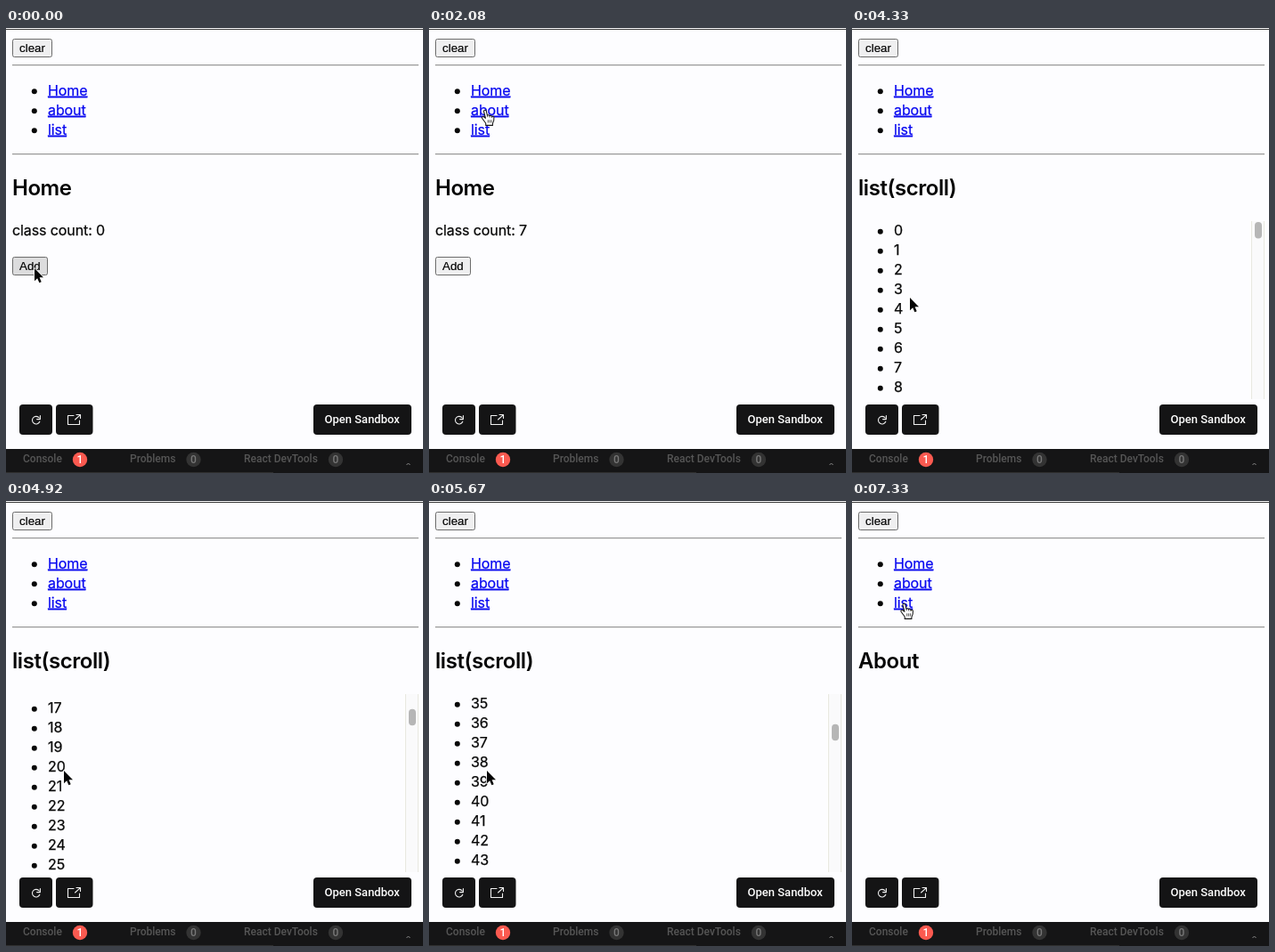
Animation, 468 px wide and 500 px high, one loop 8 s. Source, as an HTML page:

```html
<!DOCTYPE html>
<html lang="en">
<head>
<meta charset="utf-8">
<title>Keep-alive demo</title>
<style>
  html, body { margin: 0; width: 100%; height: 100%; overflow: hidden; background: #fdfdff; }
  svg { display: block; width: 100vw; height: 100vh; }
  text { white-space: pre; }
  .body { font: 400 16px Inter, sans-serif; letter-spacing: -.1px; color: #080808; fill: currentColor; stroke: currentColor; stroke-width: .25; }
  .link { color: #0808f0; text-decoration: underline; text-decoration-thickness: 1.2px; text-underline-offset: 2px; }
  .link.active { color: #ff1c0c; }
  .title { font: 600 24px Inter, sans-serif; letter-spacing: -.45px; fill: #060606; }
  .label { font: 400 13.333px "Liberation Sans", Arial, sans-serif; fill: #040404; stroke: #040404; stroke-width: .2; }
  .btn { fill: #efeff0; stroke: #6c6c6c; }
  .btn.hover { fill: #dcdcdd; }
  .btn.press { fill: #f5f5f5; }
  .tool { fill: #141415; }
  .open { font: 500 13px Roboto, sans-serif; fill: #fcfcfc; }
  .tab { font: 500 12px Roboto, sans-serif; fill: #565656; }
  .icon { fill: none; stroke: #f0f0f0; stroke-width: 1.1; stroke-linecap: round; stroke-linejoin: round; }
</style>
</head>
<body>
<svg viewBox="0 0 468 500">
  <defs><clipPath id="view"><rect x="7" y="217" width="456" height="200"/></clipPath></defs>
  <rect width="468" height="500" fill="#fdfdff"/>
  <rect y="1" width="468" height="1" fill="#3a3a3a"/>

  <rect class="btn" x="7.5" y="12.5" width="44" height="20" rx="2"/>
  <text class="label" x="15" y="27">clear</text>
  <g id="rules"></g>
  <g id="nav"></g>

  <text id="title" class="title" x="7" y="187.7">Home</text>
  <g id="home">
    <text id="count" class="body" x="7" y="233.2">class count: 0</text>
    <rect id="add" class="btn" x="7.5" y="257.5" width="39" height="20" rx="2"/>
    <text class="label" x="15" y="272">Add</text>
  </g>
  <g id="list">
    <g clip-path="url(#view)"><g id="items"></g></g>
    <rect x="448" y="217" width="15" height="200" fill="#fafafb"/>
    <path d="M448.5 217v200M462.5 217v200" stroke="#e8e8e0"/>
    <rect id="thumb" x="452" y="218" width="8" height="18.5" rx="4" fill="#b6b6b6"/>
  </g>

  <rect class="tool" x="15" y="423" width="37" height="34" rx="4"/>
  <rect class="tool" x="56" y="423" width="41.5" height="34" rx="4"/>
  <rect class="tool" x="345" y="423" width="110" height="34" rx="4"/>
  <path class="icon" d="M37.2 438A4.3 4.3 0 1 0 37.8 442.2M38.4 435.6V439.6H34.6"/>
  <path class="icon" d="M76 435.5H69.5V445.5H82.5V441M79 434.5H83.5V438.5M83.2 434.8L77.5 440"/>
  <text class="open" x="357.5" y="444.3">Open Sandbox</text>

  <rect y="473" width="468" height="27" fill="#151516"/>
  <rect y="499" width="300" height="1" fill="#2e2e2e"/>
  <g id="tabs"></g>
  <path d="M449.5 491L451.5 489L453.5 491" fill="none" stroke="#8a8a8a"/>

  <g id="cursor">
    <path id="arrow" d="M0 0V14.2L3.2 11.2L5.4 16.3L7.7 15.3L5.6 10.3H10Z"
      fill="#050505" stroke="#fff" stroke-width="1.6" paint-order="stroke" stroke-linejoin="round"/>
    <g id="hand" transform="translate(-4.5 -1) scale(1.07)" stroke="#161616" stroke-width="1" stroke-linejoin="round">
      <path fill="#fff" d="M5 1.2C4 1.2 3.6 2 3.8 2.8L5.6 9.6L3.6 8.2C2.6 7.6 1.2 8.6 2 9.8L5.8 15V17.2H13V15.4
        C14.2 13.6 14.6 11.6 14.4 9C14.3 7.6 12.8 7.4 12.2 8C11.9 6.8 10.3 6.6 9.8 7.2C9.4 6.2 8 6 7.4 6.6L6.4 2.4C6.2 1.6 5.8 1.2 5 1.2Z"/>
      <path fill="none" d="M7.4 6.6L7.8 8.6M9.8 7.2L10.1 9M12.2 8L12.3 9.4M8.2 11.5V14.5M10 11.5V14.5M11.8 11.5V14.5" stroke-width=".7"/>
    </g>
  </g>
</svg>
<script>
const LOOP = 8000, FPS = 12, ROW = 22;
const $ = id => document.getElementById(id);

function add(parent, tag, attrs, text) {
  const el = document.createElementNS("http://www.w3.org/2000/svg", tag);
  for (const k in attrs) el.setAttribute(k, attrs[k]);
  if (text !== undefined) el.textContent = text;
  parent.append(el);
  return el;
}

for (const y of [41, 141]) {
  add($("rules"), "rect", { x: 7, y, width: 456, height: 1, fill: "#989898" });
  add($("rules"), "rect", { x: 7, y: y + 1, width: 456, height: 1, fill: "#e6e6e6" });
}

function bullet(parent, y, text, cls) {
  add(parent, "circle", { cx: 31.8, cy: y + .7, r: 3, fill: "#080808" });
  return add(parent, "text", { class: "body " + cls, x: 47, y: y + 5.2 }, text);
}
const links = ["Home", "about", "list"].map((s, i) => bullet($("nav"), 70.5 + i * ROW, s, "link"));
for (let i = 0; i < 50; i++) bullet($("items"), 228 + i * ROW, i, "");

[["Console", 19, 83, 1], ["Problems", 139, 210.5, 0], ["React DevTools", 267, 370, 0]].forEach(([name, x, cx, n]) => {
  add($("tabs"), "text", { class: "tab", x, y: 488.3 }, name);
  add($("tabs"), "circle", { cx, cy: 485, r: 8.2, fill: n ? "#fb5a50" : "#333333" });
  add($("tabs"), "text", { class: "tab", x: cx, y: 489.2, "text-anchor": "middle", style: n ? "fill:#fff" : "fill:#777" }, n);
});

// All times below are in ticks of 1/12 s.
const path = [
  [0, 32, 270], [1, 29, 267], [17, 29, 267], [19, 37, 248], [21, 66, 160], [22, 71, 130], [23, 69, 109],
  [25, 62, 92], [31, 62, 92], [34, 62.5, 71], [41, 62.5, 71], [44, 61.5, 119], [49, 61.5, 119],
  [50, 62, 140], [51, 64.5, 265], [52, 65, 303], [70, 65, 303], [72, 67, 250], [74, 72, 115],
  [76, 71.5, 75], [79, 68, 90], [83, 68, 90], [88, 57.5, 115], [96, 57.5, 115]
];
const clicks = [4, 6, 8, 10, 12, 14, 16];
const pages = [[0, "Home"], [28, "About"], [38, "Home"], [48, "list(scroll)"], [82, "About"]];
const active = { 37: 0, 47: 2 };

const clamp = v => Math.min(1, Math.max(0, v));
const smooth = v => v * v * (3 - 2 * v);

function pointer(k) {
  const i = path.findIndex(p => p[0] > k);
  const [a, ax, ay] = path[i - 1], [b, bx, by] = path[i];
  const u = (k - a) / (b - a);
  return [ax + (bx - ax) * u, ay + (by - ay) * u];
}

function scrollAt(k) {
  const rest = 1 - clamp((k - 65) / 4);
  return Math.round(737 * smooth(clamp((k - 54) / 10)) + 35 * (1 - rest * rest));
}

const show = (el, on) => el.style.display = on ? "" : "none";

function draw(k) {
  const [x, y] = pointer(k);
  const page = pages.filter(p => p[0] <= k).pop()[1];
  const overLink = x > 47 && x < 91 && [70.5, 92.5, 114.5].some(c => Math.abs(y - c) < 9.5);
  const overAdd = x > 7 && x < 47 && y > 257 && y < 278;
  const pressed = k === 4 || k === 6;
  const s = scrollAt(k);

  $("title").textContent = page;
  show($("home"), page === "Home");
  show($("list"), page === "list(scroll)");
  $("count").textContent = "class count: " + clicks.filter(c => c <= k).length;
  $("add").setAttribute("class", "btn" + (pressed ? " press" : overAdd ? " hover" : ""));
  links.forEach((el, i) => el.classList.toggle("active", active[k] === i));
  $("items").setAttribute("transform", `translate(0 ${-s})`);
  $("thumb").setAttribute("y", 218 + s * 178 / 4200);
  $("cursor").setAttribute("transform", `translate(${x} ${y})`);
  show($("hand"), overLink);
  show($("arrow"), !overLink);
}

const start = performance.now();
let last = -1;
function frame() {
  const t = (performance.now() - start) % LOOP;
  const k = Math.floor((t + 4) * FPS / 1000) % (LOOP * FPS / 1000);
  if (k !== last) draw(last = k);
  requestAnimationFrame(frame);
}
frame();
</script>
</body>
</html>
```
